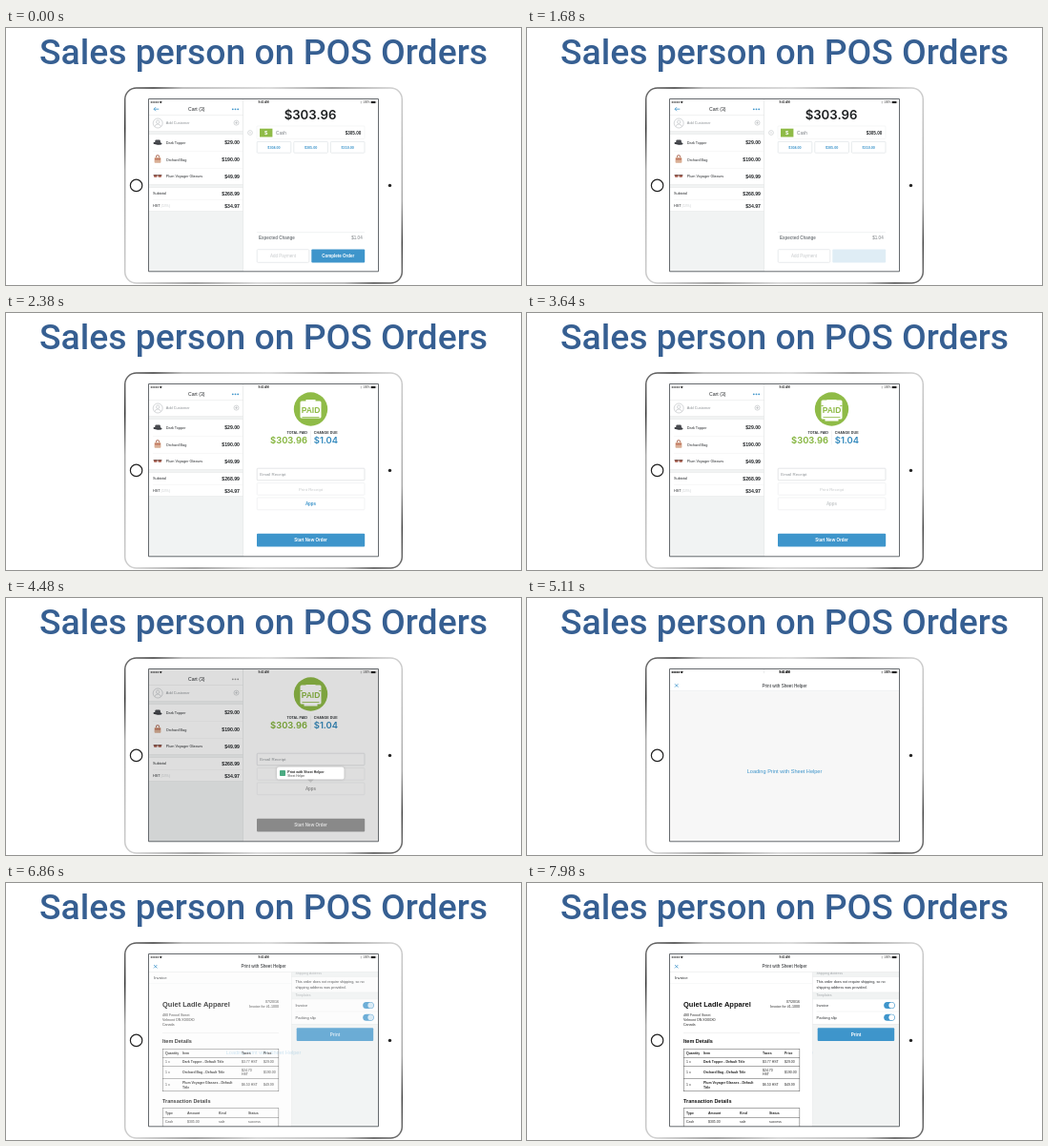
Write an HTML page with a canvas that moves like this. It is 540 px wide and 270 px high and loops after 8 s.

```html
<!DOCTYPE html>
<html lang="en">
<head>
<meta charset="utf-8">
<title>Sales person on POS Orders</title>
<style>
html, body { margin: 0; width: 100%; height: 100%; overflow: hidden; background: #fff; }
canvas { display: block; width: 540px; height: 270px; }
</style>
</head>
<body>
<canvas id="stage"></canvas>
<script>
const LOOP = 8000, STEP = 70;
const SANS = '"Liberation Sans", Arial, sans-serif';
const ROUND = 'Inter, sans-serif';
const BLUE = '#3e95cb', GREEN = '#8fbb47', INK = '#25282b', GREY = '#8d9296';
const PALE = '#c6c9cb', RULE = '#e2e4e5', PANEL = '#f1f3f3';
const APP = 'Print with Sheet Helper';

const canvas = document.getElementById('stage');
const ctx = canvas.getContext('2d');
const dpr = window.devicePixelRatio || 1;
canvas.width = 540 * dpr;
canvas.height = 270 * dpr;

const ramp = (t, a, b) => Math.min(1, Math.max(0, (t - a) / (b - a)));
const easeOut = p => 1 - (1 - p) ** 3;

function mix(a, b, p) {
  const part = (c, i) => parseInt(c.slice(i, i + 2), 16);
  return `rgb(${[1, 3, 5].map(i => Math.round(part(a, i) + (part(b, i) - part(a, i)) * p))})`;
}

function rect(x, y, w, h, fill) {
  ctx.fillStyle = fill;
  ctx.fillRect(x, y, w, h);
}

function box(x, y, w, h, r, fill, stroke, width = 0.7) {
  ctx.beginPath();
  ctx.roundRect(x, y, w, h, r);
  if (fill) { ctx.fillStyle = fill; ctx.fill(); }
  if (stroke) { ctx.strokeStyle = stroke; ctx.lineWidth = width; ctx.stroke(); }
}

function disc(x, y, r, fill, stroke, width = 0.6) {
  ctx.beginPath();
  ctx.arc(x, y, r, 0, Math.PI * 2);
  if (fill) { ctx.fillStyle = fill; ctx.fill(); }
  if (stroke) { ctx.strokeStyle = stroke; ctx.lineWidth = width; ctx.stroke(); }
}

function path(points, stroke, width) {
  ctx.beginPath();
  points.forEach(([x, y]) => ctx.lineTo(x, y));
  ctx.strokeStyle = stroke;
  ctx.lineWidth = width;
  ctx.stroke();
}

// y is the middle of the capital letters
function text(str, x, y, size, color, { weight = 400, align = 'left', font = SANS } = {}) {
  ctx.font = `${weight} ${size}px ${font}`;
  ctx.textAlign = align;
  ctx.fillStyle = color;
  ctx.fillText(str, x, y + size * 0.36);
}

const bold = { weight: 700 };
const boldRight = { weight: 700, align: 'right' };
const boldMid = { weight: 700, align: 'center' };
const mid = { align: 'center' };

function faded(alpha, draw) {
  if (alpha <= 0) return;
  ctx.save();
  ctx.globalAlpha *= alpha;
  draw();
  ctx.restore();
}

function tablet() {
  const metal = ctx.createLinearGradient(124, 63, 416, 268);
  [[0, '#777'], [0.07, '#333'], [0.14, '#aaa'], [0.35, '#d0d0d0'], [0.5, '#888'],
   [0.65, '#d0d0d0'], [0.86, '#aaa'], [0.93, '#444'], [1, '#777']]
    .forEach(([p, c]) => metal.addColorStop(p, c));
  box(124.7, 63, 290.6, 205, 12, '#fff', metal, 1.5);
  disc(136.6, 165.4, 6.2, '#fff', '#222', 1.2);
  disc(402.5, 165.4, 1.7, '#222');
}

function statusBar() {
  for (let i = 0; i < 5; i++) disc(152.3 + i * 1.75, 78, 0.75, '#333');
  ctx.beginPath();
  ctx.moveTo(162.2, 79.3);
  ctx.arc(162.2, 79.3, 2.2, -2.35, -0.79);
  ctx.fillStyle = '#333';
  ctx.fill();
  text('9:41 AM', 270, 78, 2.9, '#222', boldMid);
  text('100%', 381.5, 78, 2.8, '#333', { align: 'right' });
  path([[372.3, 76.6], [372.3, 79.4]], '#777', 0.5);
  rect(382.7, 77, 4.7, 2.1, '#222');
  rect(387.7, 77.6, 0.5, 0.9, '#222');
}

function hat() {
  ctx.fillStyle = '#3b3d42';
  ctx.beginPath();
  ctx.ellipse(159, 121.2, 4.6, 1.5, 0.08, 0, 7);
  ctx.fill();
  box(156.3, 117.4, 5.6, 3.7, 1.3, '#4a4c51');
}

function bag() {
  path([[157.3, 136], [157.8, 133.8], [160.2, 133.8], [160.8, 136]], '#a4573f', 0.8);
  box(155.6, 136, 6.8, 5.8, 0.8, '#d9ae94');
  rect(156, 137.2, 6, 1.2, '#bb6a55');
}

function glasses() {
  box(154.9, 154.3, 3.7, 2.5, 1, '#a35a4b');
  box(159.4, 154.3, 3.7, 2.5, 1, '#a35a4b');
  path([[154.5, 154.5], [163.5, 154.5]], '#55352f', 0.6);
}

function cart(arrow, tint) {
  rect(150, 75, 98.5, 181, PANEL);
  rect(150, 75, 98.5, 33.5, '#fff');
  rect(150, 111.5, 98.5, 53, '#fff');
  rect(150, 167.5, 98.5, 25, '#fff');
  for (const y of [91, 108.3, 111.3, 164.3, 167.3, 192.3]) rect(150, y, 98.5, 0.5, RULE);
  for (const y of [129, 147, 180]) rect(154, y, 94, 0.4, '#eceeee');
  faded(arrow, () => {
    path([[160.3, 85.2], [155, 85.2]], BLUE, 0.8);
    path([[157, 83.2], [155, 85.2], [157, 87.2]], BLUE, 0.8);
  });
  text('Cart (3)', 199.7, 85.3, 5.2, INK, mid);
  for (let i = 0; i < 3; i++) disc(237.8 + i * 2.7, 85.3, 0.9, tint);

  disc(159.2, 100, 5, '#fff', '#b9bdc0');
  disc(159.2, 98.7, 1.7, null, '#b9bdc0');
  ctx.beginPath();
  ctx.arc(159.2, 104.2, 3.2, Math.PI + 0.2, -0.2);
  ctx.stroke();
  text('Add Customer', 167.8, 100, 3.9, GREY);
  disc(241.5, 99.6, 2.5, null, '#a9adb0', 0.5);
  path([[240.1, 99.6], [242.9, 99.6]], '#a9adb0', 0.5);
  path([[241.5, 98.2], [241.5, 101]], '#a9adb0', 0.5);

  hat();
  bag();
  glasses();
  [['Dark Topper', '$29.00', 120.3], ['Orchard Bag', '$190.00', 138.2], ['Plum Voyager Glasses', '$49.99', 156]]
    .forEach(([name, price, y]) => {
      text(name, 167.8, y, 3.8, INK);
      text(price, 245, y, 5.2, INK, boldRight);
    });
  text('Subtotal', 154, 174, 3.8, INK);
  text('$268.99', 245, 174, 5.2, INK, boldRight);
  text('HST', 154, 187, 3.8, INK);
  text('(13%)', 162.3, 187, 3.6, PALE);
  text('$34.97', 245, 187, 5.2, INK, boldRight);
}

function checkout(pressed) {
  rect(249, 75, 141, 181, '#fff');
  text('$303.96', 319, 90.8, 13.2, '#1d1f21', { weight: 600, align: 'center', font: ROUND });
  disc(256, 110, 2.4, null, '#c2c5c7', 0.6);
  path([[255, 110], [257, 110]], '#c2c5c7', 0.6);
  box(263, 103, 113, 13.5, 0.8, null, '#f0f1f2', 0.6);
  rect(266, 105.7, 13.4, 8.8, GREEN);
  text('$', 272.7, 110, 6, '#fff', boldMid);
  text('Cash', 283, 110, 4.7, '#777c80');
  text('$305.00', 372.3, 110, 4.6, INK, boldRight);
  ['$304.00', '$305.00', '$310.00'].forEach((amount, i) => {
    box(263.2 + i * 38.6, 119.4, 35.6, 11.8, 0.8, null, '#dfe3e6');
    text(amount, 281 + i * 38.6, 125.3, 3.7, BLUE, boldMid);
  });
  rect(263, 214.6, 113, 0.5, RULE);
  text('Expected Change', 265, 220.5, 4.5, '#777c80', bold);
  text('$1.04', 373.7, 220.5, 4.6, '#777c80', { align: 'right' });
  box(263.2, 232.7, 54.6, 13.6, 1, '#fff', '#e0e3e5');
  text('Add Payment', 290.5, 239.5, 4.5, PALE, mid);
  box(320.3, 232.4, 55.9, 14.2, 1, pressed ? '#dfedf5' : BLUE);
  if (!pressed) text('Complete Order', 348.2, 239.5, 4.5, '#fff', boldMid);
}

function badge(t) {
  const size = 0.6 + 0.4 * easeOut(ramp(t, 1820, 2240));
  const feed = easeOut(ramp(t, 2450, 2870));
  ctx.save();
  ctx.translate(319.5, 101);
  ctx.scale(size, size);
  disc(0, 0, 17.7, GREEN);
  box(-11, -8.5 - feed, 22, 18 + feed * 2, 1.5, '#fff');
  rect(-5, -10, 10, 2, '#fff');
  rect(-9, 8, 18, 0.8, GREEN);
  if (feed > 0) {
    rect(-11, -4, 2.2 * feed, 1, GREEN);
    rect(11 - 2.2 * feed, -4, 2.2 * feed, 1, GREEN);
    rect(-7, 10, 14, 2.5 * feed, '#fff');
  }
  text('PAID', 0, 0.5, 8.5, GREEN, boldMid);
  ctx.restore();
}

function paid(t, tint, appsColor) {
  rect(249, 75, 141, 181, '#fff');
  badge(t);
  text('TOTAL PAID', 316, 125.7, 3.7, '#33373a', boldRight);
  text('CHANGE DUE', 322.8, 125.7, 3.7, '#33373a', bold);
  rect(319.3, 123.5, 0.4, 15, RULE);
  text('$303.96', 316, 134, 9.4, '#82b33a', { weight: 600, align: 'right', font: ROUND });
  text('$1.04', 322.8, 134, 9.4, '#3389bd', { weight: 600, font: ROUND });
  box(263.2, 163.2, 112.8, 12.6, 0.8, '#fff', '#d9dcde');
  text('Email Receipt', 266.3, 169.4, 4.4, GREY);
  box(263.2, 178.6, 112.8, 12.6, 0.8, '#fff', '#eceeef');
  text('Print Receipt', 319.5, 185, 4.4, PALE, mid);
  box(263.2, 194, 112.8, 12.8, 0.8, '#fff', '#eceeef');
  text('Apps', 319.5, 200.4, 4.5, appsColor, boldMid);
  box(263, 231.8, 113.2, 13.8, 1, tint);
  text('Start New Order', 319.5, 238.7, 4.5, '#fff', boldMid);
}

function popover(tapped) {
  ctx.save();
  ctx.shadowColor = 'rgba(0,0,0,.2)';
  ctx.shadowBlur = 3;
  box(284, 177.5, 70.5, 13, 2.6, tapped ? '#e9e9e9' : '#fff');
  ctx.restore();
  ctx.beginPath();
  ctx.moveTo(316, 190.4);
  ctx.lineTo(319.4, 194);
  ctx.lineTo(322.8, 190.4);
  ctx.fill();
  box(287, 181, 6, 6, 0.8, '#4cab83');
  text(APP, 295.3, 182.3, 3.5, '#222', bold);
  text('Sheet Helper', 295.3, 186.8, 3.1, '#444');
}

function loading(t) {
  rect(150, 94, 240, 162, '#f7f7f7');
  const count = Math.floor(Math.max(0, t - 5180) / 210) % 4;
  for (let i = 0; i < count; i++) disc(262.6 + i * 7.4, 169, 2.3, BLUE);
  text('Loading ' + APP, 270, 178, 5.6, BLUE, mid);
}

function toggle(y) {
  box(374.2, y - 3.5, 11.6, 7, 3.5, BLUE);
  disc(382.3, y, 2.9, '#fff');
}

function tableRow(cells, columns, y, weight) {
  cells.forEach((cell, i) => {
    const lines = cell.split('\n');
    const strong = weight || (columns.length === 4 && columns[1] === 185 && i === 1 ? 700 : 400);
    lines.forEach((line, n) =>
      text(line, columns[i], y + (n - (lines.length - 1) / 2) * 4.8, 3.5, '#222', { weight: strong }));
  });
}

function grid(lines, bottom) {
  for (const y of lines) rect(164, y, 122, 0.5, '#555');
  for (const x of [164, 285.6]) rect(x, lines[0], 0.5, bottom - lines[0], '#555');
}

function invoice() {
  rect(150, 94, 149.5, 162, '#fff');
  text('Invoice', 155, 99.3, 4.3, INK);
  rect(150, 105.5, 149.5, 0.4, '#eef0f0');
  text('Quiet Ladle Apparel', 164, 127.7, 7.5, '#111', bold);
  text('07/20/16', 286, 125, 3.6, '#222', { align: 'right' });
  text('Invoice for #1-1000', 286, 130, 3.6, '#222', { align: 'right' });
  ['480 Fennel Street', 'Velmont ON X0X0X0', 'Canada']
    .forEach((line, i) => text(line, 164, 138.8 + i * 5, 3.6, '#222'));
  rect(164, 157.5, 122, 0.4, '#ddd');
  text('Item Details', 164, 166.3, 5.5, '#111', bold);

  const items = [167, 185, 247, 270];
  grid([174, 183, 192, 205, 218.5], 219);
  tableRow(['Quantity', 'Item', 'Taxes', 'Price'], items, 178.7, 700);
  tableRow(['1 x', 'Dark Topper - Default Title', '$3.77 HST', '$29.00'], items, 187.6);
  tableRow(['1 x', 'Orchard Bag - Default Title', '$24.70\nHST', '$190.00'], items, 198.7);
  tableRow(['1 x', 'Plum Voyager Glasses - Default\nTitle', '$6.50 HST', '$49.99'], items, 212);

  text('Transaction Details', 164, 229, 5.5, '#111', bold);
  const payments = [167, 190, 223, 254];
  grid([236.5, 246], 256);
  tableRow(['Type', 'Amount', 'Kind', 'Status'], payments, 241.4, 700);
  tableRow(['Cash', '$305.00', 'sale', 'success'], payments, 250.7);
}

function options() {
  rect(299.5, 91, 90.5, 165, PANEL);
  rect(299.5, 98.5, 90.5, 16.3, '#fff');
  rect(299.5, 122, 90.5, 26, '#fff');
  rect(299.3, 94, 0.4, 162, RULE);
  for (const y of [98.3, 114.8, 121.8, 148]) rect(299.5, y, 90.5, 0.4, RULE);
  rect(303.5, 134.8, 86.5, 0.4, RULE);
  text('Shipping Address', 303.5, 94.7, 3.5, '#a3a7aa');
  text('This order does not require shipping, so no', 303.5, 103.8, 3.8, INK);
  text('shipping address was provided.', 303.5, 109.2, 3.8, INK);
  text('Templates', 303.5, 118.2, 3.5, '#a3a7aa');
  text('Invoice', 303.5, 128.5, 4, INK);
  text('Packing slip', 303.5, 141.2, 4, INK);
  toggle(128.5);
  toggle(141.2);
  box(304.7, 152.2, 80.5, 13.8, 1, BLUE);
  text('Print', 345, 159.2, 4.6, '#fff', boldMid);
}

function printSheet(t) {
  rect(150, 75, 240, 181, '#fff');
  loading(t);
  faded(ramp(t, 6650, 6930), () => {
    invoice();
    options();
  });
  rect(150, 75, 240, 18.5, '#fff');
  rect(150, 93.3, 240, 0.5, RULE);
  path([[155, 86], [158.4, 89.4]], BLUE, 0.8);
  path([[158.4, 86], [155, 89.4]], BLUE, 0.8);
  text(APP, 270, 87.8, 4.6, INK, mid);
}

function register(t) {
  const swap = ramp(t, 1680, 2030);
  const dim = ramp(t, 3780, 3990) * (1 - ramp(t, 4690, 4900));
  const tint = mix(BLUE, '#9d9d9d', dim);
  const apps = t >= 3500 && t < 3780 ? PALE : tint;
  cart(1 - swap, tint);
  if (swap < 1) checkout(t >= 1050);
  faded(swap, () => paid(t, tint, apps));
  rect(248.3, 75, 0.6, 181, '#dfe2e3');
  return dim;
}

function draw(t) {
  ctx.setTransform(dpr, 0, 0, dpr, 0, 0);
  rect(0, 0, 540, 270, '#fff');
  text('Sales person on POS Orders', 270, 24.7, 37.3, '#365f92',
    { weight: 500, align: 'center', font: 'Roboto, sans-serif' });
  tablet();

  ctx.save();
  ctx.beginPath();
  ctx.rect(149.5, 74.5, 241, 181.5);
  ctx.clip();
  const slide = easeOut(ramp(t, 4760, 5250));
  const dim = slide < 1 ? register(t) : 0;
  if (slide < 1) statusBar();
  faded(dim, () => {
    rect(149, 74, 242, 182, 'rgba(0,0,0,.13)');
    popover(t >= 4620);
  });
  if (slide > 0) {
    ctx.save();
    ctx.translate(0, 181 * (1 - slide));
    printSheet(t);
    ctx.restore();
    statusBar();
  }
  ctx.restore();
  box(149.5, 74.5, 241, 181.3, 0, null, '#555a5e', 0.9);
}

const start = performance.now();
function tick() {
  const t = (performance.now() - start) % LOOP;
  draw(Math.floor(t / STEP) * STEP);
  requestAnimationFrame(tick);
}
tick();
</script>
</body>
</html>
```
